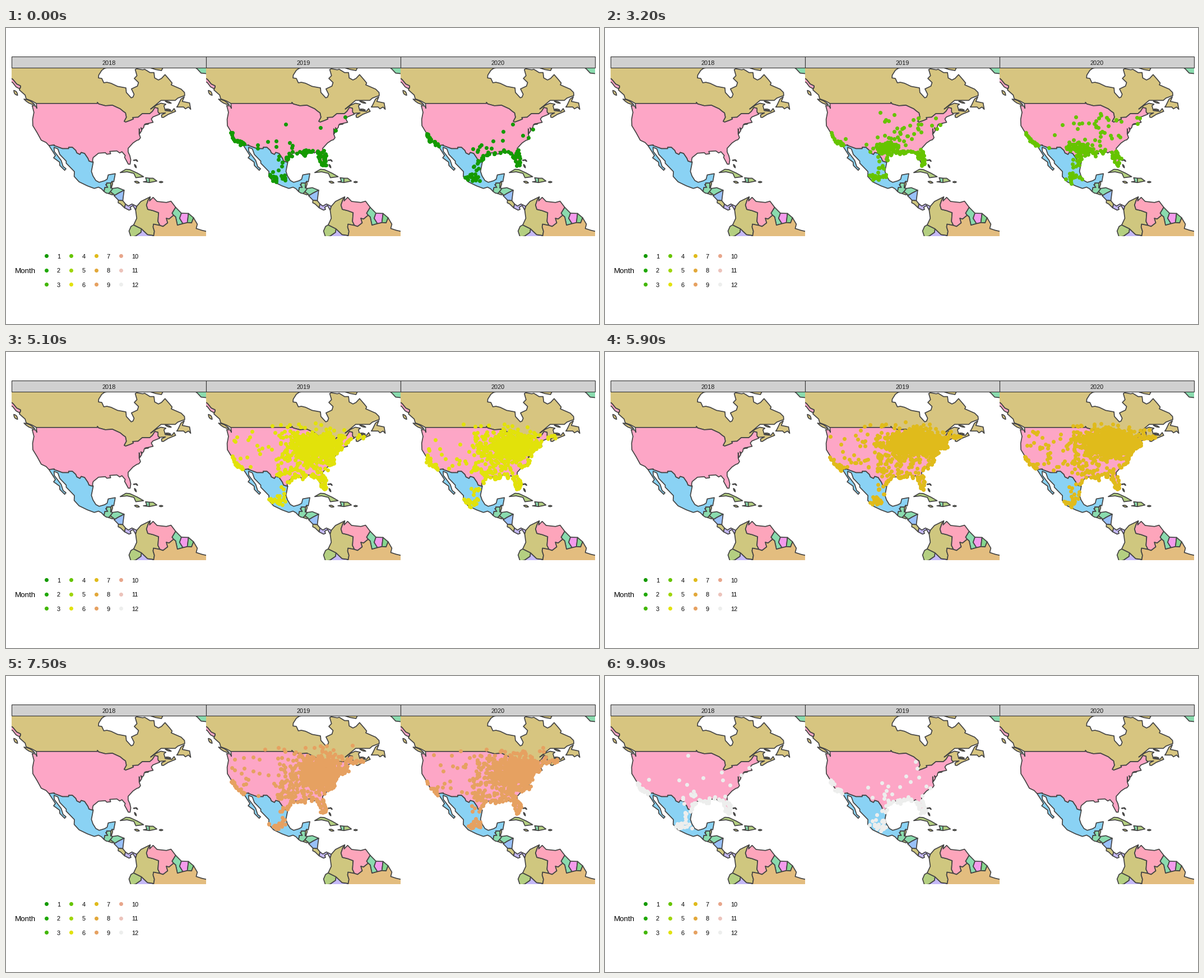
Animation, 1058 px wide and 529 px high, one loop 10 s. Source, as a matplotlib script:

```python
import numpy as np
import matplotlib.pyplot as plt
from matplotlib.animation import FuncAnimation
from matplotlib.collections import PolyCollection
from matplotlib.patches import Rectangle
from matplotlib.path import Path

W, H, DPI = 1058, 529, 100
PX = 72 / DPI                      # points per pixel
LEFT, TOP, BOTTOM, PANEL = 10, 71, 372, 347.1
LON_WEST, LON_SPAN, LAT_NORTH, LAT_SPAN = -134, 88, 63, 66
YEARS = (2018, 2019, 2020)

MONTH_COLORS = ["#149A00", "#1FA800", "#42B700", "#66C400", "#9FD506", "#E2E20A",
                "#E0BB1B", "#E2A83A", "#E6A161", "#E8A68B", "#ECC3BB", "#EDEEED"]
TAN, PINK, SKY, BLUE = "#D7C580", "#FDA6C6", "#8AD2F4", "#99C1FA"
OLIVE, LIME, MINT, GREEN = "#CFC77F", "#B4CF81", "#8ADBAE", "#86D68E"
LAVENDER, ROSE, MAGENTA, ORANGE = "#C4B8F6", "#FDA5BB", "#F49BEC", "#E3BD7F"

# Key points of borders and coasts in degrees; neighbours share them
LAKES = [(-122.8, 49), (-95.2, 49), (-95.2, 49.4), (-94.6, 48.8), (-91.6, 48.1),
         (-88.4, 48.3), (-84.9, 46.9), (-83.5, 45.9), (-82.5, 45.3), (-82.1, 43.6),
         (-83.1, 42), (-82.4, 41.7), (-80.2, 42.4), (-78.9, 42.9), (-79.2, 43.5),
         (-76.8, 43.6), (-74.9, 45), (-71.5, 45), (-70.3, 45.9), (-69.2, 47.4),
         (-67.8, 47.1), (-67.8, 45.7), (-67, 44.8)]
ATLANTIC = [(-70.1, 43.7), (-70.8, 42.9), (-70, 41.6), (-73.7, 40.9), (-72, 41),
            (-74, 40.6), (-74.2, 39.7), (-74.9, 38.9), (-75.5, 39.5), (-75.1, 38.4),
            (-76, 37.2), (-76.3, 39.1), (-76.3, 37), (-75.7, 35.6), (-76.4, 34.8),
            (-77.4, 34.5), (-79.1, 33.5), (-81.3, 31.4)]
FLORIDA = [(-81.3, 30), (-80.5, 28.5), (-80.1, 26.9), (-80.4, 25.2), (-81.2, 25.2),
           (-82.9, 27.9), (-82.6, 28.6), (-84.1, 30.1)]
GULF = [(-85.1, 29.6), (-86.4, 30.4), (-89.6, 30.2), (-89.2, 29.3), (-90.9, 29.1),
        (-91.6, 29.7), (-94.7, 29.5), (-97.1, 27.8), (-97.4, 26.7)]
RIO = [(-117.1, 32.5), (-114.7, 32.7), (-114.8, 32.5), (-111, 31.3), (-108.2, 31.3),
       (-108.2, 31.8), (-106.5, 31.8), (-105, 30.6), (-104.5, 29.6), (-103.1, 29),
       (-102.5, 29.8), (-101, 29.4), (-99.5, 27.5), (-99, 26.4), (-97.1, 25.9)]
PACIFIC = [(-118.4, 33.7), (-120.6, 34.6), (-122.5, 37.6), (-124.4, 40.3), (-124.5, 42.8),
           (-123.9, 45.5), (-124.7, 48.2), (-123.1, 48), (-122.6, 47.1)]
PANHANDLE = [(-134.3, 58.9), (-133.4, 58.4), (-131.7, 56.6), (-130, 55.9), (-130, 55.3)]
HUDSON = [(-90.8, 63), (-91.9, 62.8), (-93.2, 62), (-94.6, 60.1), (-94.7, 59),
          (-93.2, 58.8), (-92.3, 57.1), (-90.9, 57.3), (-89, 56.9), (-86.1, 55.7),
          (-82.3, 55.1), (-82.1, 53.3), (-79.9, 51.2), (-79.1, 51.5), (-78.6, 52.6),
          (-79.8, 54.7), (-77.1, 55.8), (-76.6, 57.2), (-78.5, 58.8), (-77.3, 59.9),
          (-78.1, 62.3), (-77.4, 62.6), (-74.7, 62.2), (-73.8, 62.4), (-71.4, 61.1),
          (-69.6, 61.1), (-69.3, 59), (-67.6, 58.2), (-66.2, 58.8), (-64.6, 60.3)]
LABRADOR = [(-62.5, 58.2), (-61.4, 57), (-61.8, 56.3), (-57.3, 54.6), (-55.8, 53.3),
            (-55.7, 52.1), (-58.8, 51.1), (-60, 50.2), (-66.4, 50.2), (-71.1, 46.8),
            (-68.6, 48.3), (-66.5, 49.1), (-64.2, 48.7), (-65.1, 48.1), (-64.5, 46.2),
            (-61.5, 45.9), (-60.5, 47), (-59.8, 45.9), (-63.2, 44.7), (-65.4, 43.5),
            (-66.1, 43.6), (-66.2, 44.5), (-64.4, 45.3), (-67.1, 45.1)]
YUCATAN = [(-97.9, 22.4), (-97.2, 20.6), (-95.9, 18.8), (-94.4, 18.1), (-92, 18.7),
           (-90.8, 19.3), (-90.3, 21), (-87.1, 21.5), (-87.8, 18.3), (-88.5, 18.5)]
CHIAPAS = [(-89.1, 17.8), (-91, 17.8), (-91, 17.2), (-91.4, 17.2), (-90.5, 16.1),
           (-91.8, 16.1), (-92.2, 14.5)]
SONORA = [(-93.4, 15.6), (-94.7, 16.2), (-96.6, 15.7), (-99.7, 16.7), (-103.5, 18.3),
          (-105.7, 20.4), (-105.6, 22.3), (-109.3, 25.6), (-109.3, 26.4), (-112.2, 29),
          (-113.1, 31.2), (-114.8, 31.8), (-114.7, 30.2), (-111.6, 26.7), (-110.7, 24.3),
          (-109.4, 23.4), (-110, 22.8), (-112.2, 24.7), (-112.3, 26), (-115, 27.7),
          (-114.2, 28.6)]
HONDURAS_SOUTH = [(-83.1, 15), (-85.8, 13.8), (-87.3, 13)]
ORINOCO = [(-71.3, 12.4), (-72.2, 11.2), (-73, 9.2), (-72.4, 7.5), (-70, 7), (-67.5, 6.2),
           (-67.8, 2.8), (-66.9, 1.2)]
RORAIMA = [(-66.9, 1.2), (-65.5, 0.8), (-63.4, 2.2), (-64, 4), (-62.8, 3.7), (-60.7, 5.2)]
AMAZON = [(-69.8, 1.7), (-70, 0.6), (-69.4, -1.1), (-70, -4.2)]

CANADA = [(-136, 66), (-136, 59.5)] + PANHANDLE + [
    (-130.5, 54.3), (-127.9, 52.3), (-127.4, 50.8), (-124.9, 50)
    ] + LAKES + LABRADOR[::-1] + HUDSON[::-1] + [(-90, 66)]
USA = LAKES + ATLANTIC + FLORIDA + GULF + RIO[::-1] + PACIFIC
MEXICO = RIO + YUCATAN + CHIAPAS + SONORA


def islet(start, end, width):
    """A narrow lens-shaped island between two ends."""
    a, b = np.array(start, float), np.array(end, float)
    side = np.array([a[1] - b[1], b[0] - a[0]]) / np.hypot(*(b - a)) * width / 2
    t = np.linspace(0, 1, 5)[:, None]
    spine, bulge = a + t * (b - a), np.sin(np.pi * t) * side
    return np.vstack([spine + bulge, (spine - bulge)[::-1]])


LANDS = [
    (TAN, CANADA), (PINK, USA), (SKY, MEXICO),
    (PINK, [(-136, 59.5)] + PANHANDLE + [(-130.5, 54.8), (-132, 55.5), (-133.5, 57.2),
                                         (-136, 58.2)]),
    (TAN, [(-59.3, 47.6), (-58.8, 48.2), (-57.4, 50.7), (-55.9, 51.6), (-56.8, 49.8),
           (-53.5, 49.2), (-53, 46.7), (-54, 47.6), (-55.4, 46.9), (-56.2, 47.6)]),
    (TAN, islet((-128.4, 50.7), (-123.5, 48.5), 1)),
    (TAN, islet((-133, 54.1), (-131.3, 52.2), 1.1)),
    (TAN, islet((-64.5, 49.9), (-61.8, 49.1), 0.5)),
    (TAN, islet((-64.4, 46.7), (-62, 46.4), 0.5)),
    (TAN, [(-73, 64), (-71, 62.9), (-68.9, 62.3), (-66.2, 61.9), (-65, 64)]),
    (MINT, [(-53, 65), (-51.6, 63.6), (-49.9, 62.4), (-48.3, 60.9), (-44, 60.5), (-44, 65)]),
    (OLIVE, [(-89.1, 17.8), (-88.5, 18.5), (-88.3, 17.5), (-88.9, 15.9), (-89.2, 15.9)]),
    (MINT, CHIAPAS + [(-91.2, 13.9), (-90.1, 13.7), (-89.3, 14.4), (-88.2, 15.7),
                      (-89.2, 15.9)]),
    (LIME, [(-90.1, 13.7), (-89.3, 14.4), (-87.8, 13.4), (-88.5, 13.2)]),
    (MINT, [(-88.2, 15.7), (-86, 16)] + HONDURAS_SOUTH + [(-87.8, 13.4), (-89.3, 14.4)]),
    (BLUE, HONDURAS_SOUTH + [(-87.7, 12.9), (-85.7, 11.1), (-83.7, 10.9), (-83.5, 12.4)]),
    (OLIVE, [(-83.7, 10.9), (-82.5, 9.6), (-82.9, 8.1), (-84.7, 9.6), (-85.8, 10.1),
             (-85.7, 11.1)]),
    (LAVENDER, [(-82.5, 9.6), (-81.2, 8.8), (-79.6, 9.6), (-77.4, 8.7), (-77.9, 7.2),
                (-79.1, 9), (-80.4, 8.3), (-80, 7.5), (-80.9, 7.2), (-82.9, 8.1)]),
    (LAVENDER, [(-80, -5), (-78, -3), (-75.5, -1.5), (-75.3, -0.1), (-72.5, -2.4),
                (-70, -2.7), (-70, -5)]),
    (LIME, [(-78.8, 1.4), (-80, 0.8), (-80.9, -1), (-80, -3.4), (-78, -3), (-75.5, -1.5),
            (-75.3, -0.1)]),
    (OLIVE, [(-77.4, 8.7), (-75.5, 10.6)] + ORINOCO + AMAZON + [
        (-70, -2.7), (-72.5, -2.4), (-75.3, -0.1), (-78.8, 1.4), (-77.4, 4), (-77.9, 7.2)]),
    (ROSE, ORINOCO + RORAIMA + [(-61.4, 6), (-59.8, 8.3), (-61.9, 10.7), (-64, 10.2),
                                (-68.2, 10.6), (-70, 12.2), (-71.6, 10.8)]),
    (MINT, [(-59.8, 8.3), (-57.2, 6), (-58, 4), (-56.5, 1.9), (-59, 1.3), (-59.8, 4.5),
            (-60.7, 5.2), (-61.4, 6)]),
    (MAGENTA, [(-57.2, 6), (-54, 5.9), (-54.5, 2.3), (-56.5, 1.9), (-58, 4)]),
    (GREEN, [(-54, 5.9), (-51.7, 4.2), (-52.6, 2.2), (-54.5, 2.3)]),
    (ORANGE, AMAZON[::-1] + RORAIMA + [
        (-59.8, 4.5), (-59, 1.3), (-56.5, 1.9), (-54.5, 2.3), (-52.6, 2.2), (-51.7, 4.2),
        (-50, 1.7), (-50.5, 0), (-48, -0.7), (-44, -1.5), (-44, -5)]),
    (LIME, [(-84.9, 21.9), (-82.3, 23.2), (-80.6, 23.1), (-77.1, 21.7), (-74.3, 20.3),
            (-77.8, 19.9), (-78.7, 21.6), (-81.8, 22.2)]),
    (MINT, [(-71.7, 19.7), (-73.4, 19.9), (-72.8, 18.5), (-74.4, 18.3), (-71.7, 18)]),
    (LIME, [(-71.7, 19.7), (-70, 19.7), (-68.3, 18.6), (-70.5, 18.2), (-71.7, 18)]),
    (OLIVE, islet((-78.4, 18.4), (-76.2, 17.9), 0.7)),
    (LIME, islet((-67.2, 18.2), (-65.6, 18.2), 0.5)),
    (TAN, islet((-78.4, 25.1), (-77.6, 23.8), 0.5)),
    (TAN, islet((-78.9, 26.7), (-77.8, 26.8), 0.2)),
    (TAN, islet((-77.8, 27), (-77, 26.3), 0.3)),
]
USA_PATH, CANADA_PATH, MEXICO_PATH = Path(USA), Path(CANADA), Path(MEXICO)
MARITIME = [(-71, 44.3), (-67.5, 45), (-65.5, 45.4), (-63, 45.3)]


def project(points, panel):
    lon, lat = np.array(points, float).T
    x = LEFT + PANEL * (panel + (lon - LON_WEST) / LON_SPAN)
    y = TOP + (BOTTOM - TOP) * (LAT_NORTH - lat) / LAT_SPAN
    return np.column_stack([x, y])


def peak(month, top, width):
    return np.exp(-((month - top) / width) ** 2)


def along(rng, line, n, spread=0.35):
    """Random points near a polyline."""
    t, k = rng.uniform(0, len(line) - 1, int(n)), np.arange(len(line))
    pts = np.column_stack([np.interp(t, k, axis) for axis in zip(*line)])
    return pts + rng.normal(0, spread, pts.shape)


def inside(pts, n, *paths):
    """The first n points that lie on one of the lands."""
    keep = np.any([p.contains_points(pts) for p in paths], axis=0)
    return pts[keep][:int(n)]


def sightings(month, year):
    """Coasts all year, Texas in spring and autumn, the north in summer."""
    rng = np.random.default_rng(100 * year + month)
    summer, growing = peak(month, 7.6, 1.7), peak(month, 7.5, 2.4)
    passage = peak(month, 4, 1.3) + peak(month, 10.2, 1)
    off = abs(month - 7)
    center = (-83 + 1.3 * max(month - 7, 0), 43 - 1.4 * off)
    spread = (6, 2.2 + 0.6 * off)

    def blob(mid, sd):
        return rng.normal(mid, sd, (15000, 2))

    def box(low, high):
        return rng.uniform(low, high, (2500, 2))

    return np.vstack([
        along(rng, RIO[:1] + PACIFIC[:3], 22),
        along(rng, GULF, 25),
        along(rng, FLORIDA, 34),
        along(rng, ATLANTIC, 2 + 45 * summer),
        along(rng, MARITIME, 18 * summer),
        inside(blob((-97.2, 31.4), (2.8, 1.3)), 6 + 75 * passage, USA_PATH),
        inside(blob((-102, 20), (2.3, 0.9)), 19, MEXICO_PATH),
        inside(blob((-99.8, 25), (1.4, 2.2)), 7, MEXICO_PATH),
        inside(blob(center, spread), 1300 * summer, USA_PATH, CANADA_PATH),
        inside(box((-101.5, 31), (-82, 47.4)), 150 * growing, USA_PATH),
        inside(box((-122.6, 31.4), (-99.7, 47.9)), 42 * summer, USA_PATH),
        inside(box((-108, 48), (-77, 50.5)), 18 * summer, CANADA_PATH),
        inside(box((-118, 31), (-75, 41)), 6, USA_PATH),
    ])


def month_points(month):
    """Records run from November 2018 to October 2020."""
    return np.vstack([project(sightings(month, year), i) for i, year in enumerate(YEARS)
                      if (2018, 11) <= (year, month) <= (2020, 10)])


POINTS = [month_points(m) for m in range(1, 13)]

plt.rcParams["font.family"] = "Liberation Sans"
fig = plt.figure(figsize=(W / DPI, H / DPI), dpi=DPI, facecolor="white")
ax = fig.add_axes([0, 0, 1, 1])
ax.set_xlim(0, W)
ax.set_ylim(H, 0)
ax.axis("off")


def label(x, y, text, size, ha="left", color="black"):
    ax.text(x, y, text, fontsize=size * PX, ha=ha, va="baseline", color=color)


def draw_panel(i):
    x = LEFT + i * PANEL
    lands = PolyCollection([project(pts, i) for _, pts in LANDS],
                           facecolors=[c for c, _ in LANDS], edgecolors="#444444",
                           linewidths=1.7 * PX, joinstyle="round", zorder=1)
    ax.add_collection(lands, autolim=False)
    lands.set_clip_path(Rectangle((x, TOP), PANEL, BOTTOM - TOP, transform=ax.transData))
    ax.add_patch(Rectangle((x, 51), PANEL, TOP - 51, facecolor="#D0D0D0",
                           edgecolor="#333333", linewidth=1.1 * PX, zorder=3))
    label(x + PANEL / 2, 65.7, str(YEARS[i]), 11, "center", "#1A1A1A")


def draw_legend():
    label(15.5, 438, "Month", 13.4)
    for k, color in enumerate(MONTH_COLORS):
        col, row = divmod(k, 3)
        x, y = 71.7 + 44.5 * col, 407.4 + 25.5 * row
        ax.plot(x, y, "o", color=color, markersize=7 * PX, markeredgewidth=0)
        label(x + 19, y + 4.4, str(k + 1), 11)


for i in range(3):
    draw_panel(i)
draw_legend()
dots, = ax.plot([], [], "o", markersize=7 * PX, markeredgewidth=0, zorder=2)


def month_at(frame):
    """Zero-based month; the first four months stay one step longer."""
    return frame // 9 if frame < 36 else 4 + (frame - 36) // 8


def update(frame):
    m = month_at(frame)
    dots.set_data(*POINTS[m].T)
    dots.set_color(MONTH_COLORS[m])
    return dots,


anim = FuncAnimation(fig, update, frames=100, interval=100, repeat=True, repeat_delay=0)
plt.show()
```
